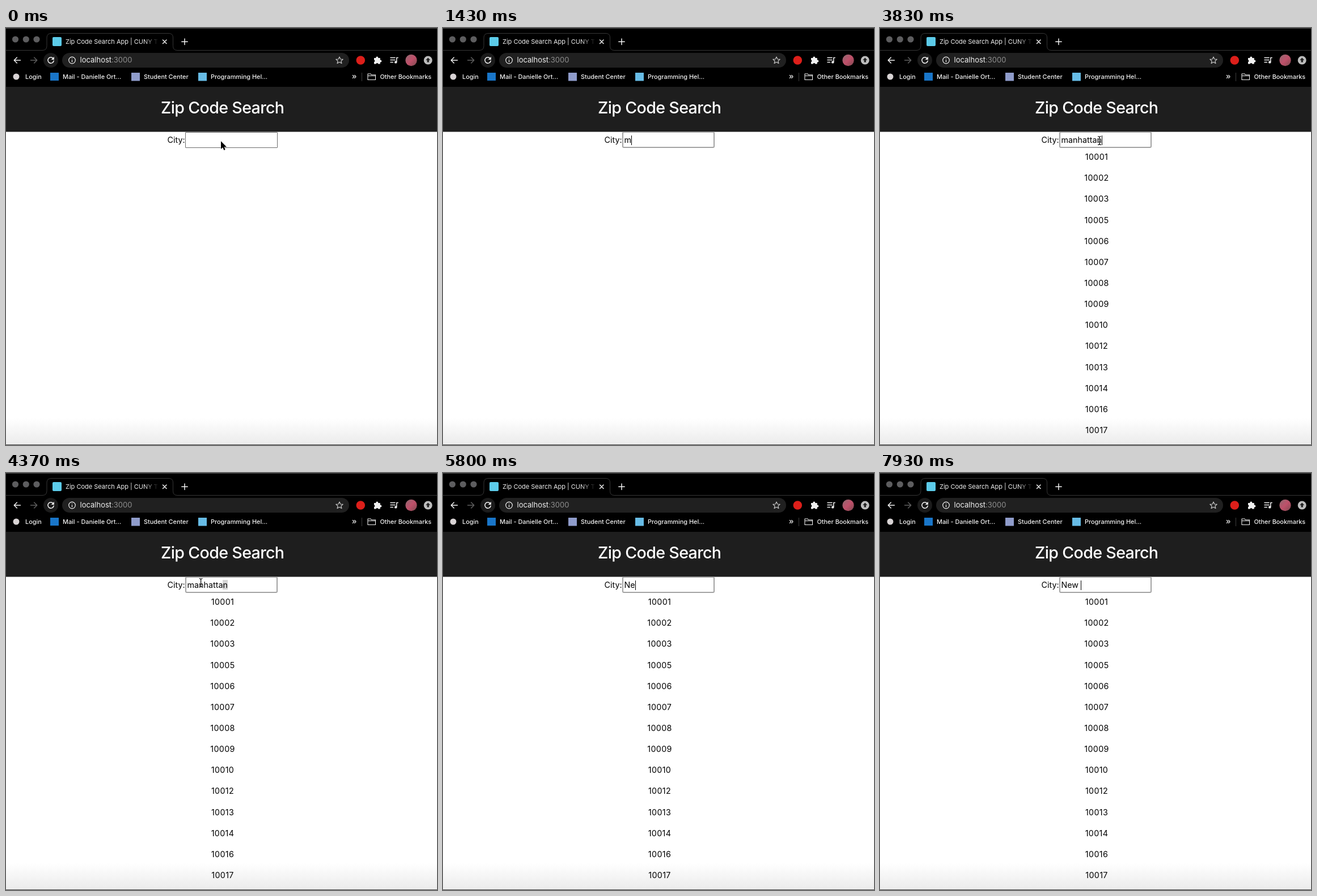
These frames come from a looping animation (760 by 737 pixels, 8000 ms). An HTML page:

```html
<!DOCTYPE html>
<html lang="en">
<head>
<meta charset="utf-8">
<title>Zip Code Search</title>
<style>
  html, body { margin: 0; width: 100%; height: 100%; overflow: hidden; background: #fff; }
  body { position: relative; font-family: Inter, "Liberation Sans", sans-serif; font-optical-sizing: none; }
  svg { position: absolute; left: 0; top: 0; display: block; }
  svg text { white-space: pre; }
  .line { fill: none; stroke: #f1f1f1; stroke-width: 1.5; stroke-linecap: round; stroke-linejoin: round; }
  .tab { font-size: 11px; fill: #f1f1f1; }
  .url { font-size: 13px; fill: #f1f1f1; }
  .marks { font-size: 10.9px; font-weight: 500; fill: #f1f1f1; }
  .title { font-size: 28.6px; font-weight: 500; letter-spacing: -.65px; fill: #fff; }
  .label { font-size: 14.3px; }
  #list { font-size: 14.3px; letter-spacing: .35px; text-anchor: middle; }
  #field {
    position: absolute; left: 316px; top: 184px; width: 162.5px; height: 27.5px;
    box-sizing: border-box; border: 1px solid #6c6c6c; border-radius: 1px; background: #fff;
  }
  #field.focus { left: 315.5px; top: 183px; width: 163px; height: 29px; border: 2px solid #a3a3a3; border-radius: 3px; }
  #entry {
    position: absolute; left: 319.5px; top: 184px; height: 27px; line-height: 27px;
    font-size: 14.3px; white-space: pre; color: #000;
  }
  #entry mark { background: #d4d4d4; color: inherit; }
  #caret { display: inline-block; width: 1px; height: 17px; margin-right: -1px; vertical-align: -4px; background: #000; }
  #menu {
    position: absolute; left: 316px; top: 212px; width: 178px; height: 82px; border-radius: 4px;
    background: #242424; box-shadow: 0 1px 3px rgba(0, 0, 0, .45);
    color: #f1f1f1; font-size: 12px; font-weight: 500; letter-spacing: .25px;
  }
  #menu div { position: relative; left: 11px; top: 8px; height: 33.4px; line-height: 33.4px; }
</style>
</head>
<body>
<svg width="760" height="737" viewBox="0 0 760 737">
  <defs>
    <linearGradient id="fade"><stop offset="0" stop-opacity="0"/><stop offset="1"/></linearGradient>
    <linearGradient id="floor" x2="0" y2="1">
      <stop offset="0" stop-color="#fff"/><stop offset="1" stop-color="#ebebeb"/>
    </linearGradient>
    <linearGradient id="face" x2="1" y2="1">
      <stop offset="0" stop-color="#8c6a70"/><stop offset=".5" stop-color="#c0506a"/><stop offset="1" stop-color="#7d4a50"/>
    </linearGradient>
  </defs>

  <rect width="760" height="104"/>
  <rect width="760" height="1" fill="#4a4a4a"/>
  <rect y="104" width="760" height="79.5" fill="#1e1e1e"/>
  <rect y="690" width="760" height="46" fill="url(#floor)"/>
  <rect y="736" width="760" height="1" fill="#4a4a4a"/>

  <!-- tab strip -->
  <g fill="#5d5d5f"><circle cx="16.5" cy="20" r="5.6"/><circle cx="35.3" cy="20" r="5.6"/><circle cx="54" cy="20" r="5.6"/></g>
  <path d="M0 39.5H64Q72 39.5 72 31.5V17Q72 9.5 80 9.5H287Q294.5 9.5 294.5 17V31.5Q294.5 39.5 302 39.5H760" fill="none" stroke="#363636"/>
  <rect x="82" y="16" width="16" height="16" rx="2" fill="#5ccbe9"/>
  <text class="tab" x="105" y="28">Zip Code Search App | CUNY T</text>
  <rect x="243" y="14" width="26" height="20" fill="url(#fade)"/>
  <path class="line" d="M276.5 21l6.5 6.5M283 21l-6.5 6.5"/>
  <path class="line" stroke-width="1.8" d="M315 19v10.4M309.8 24.2h10.4"/>

  <!-- toolbar -->
  <path class="line" d="M25.5 57H14.5M19.3 52l-5 5 5 5"/>
  <path class="line" style="stroke:#5f5f5f" d="M43.5 57h11M49.7 52l5 5-5 5"/>
  <circle cx="79" cy="57" r="13" fill="#1b1b1b"/>
  <path class="line" d="M83.2 53.8A5.2 5.2 0 1 0 84.2 58"/>
  <path d="M84.9 50.8v5.2h-5.2z" fill="#f1f1f1"/>
  <rect x="99" y="44" width="506" height="26" rx="13" fill="#202020"/>
  <circle class="line" style="stroke-width:1.2" cx="116.5" cy="57" r="5.8"/>
  <path class="line" style="stroke-width:1.3" d="M116.5 56.8v3M116.5 54.1v.1"/>
  <text class="url" x="130.5" y="61.4">localhost<tspan fill="#8f8f8f">:3000</tspan></text>
  <path class="line" style="stroke:#c9c9c9;stroke-width:1.2" d="M588 51l1.8 4 4.4.4-3.3 2.9 1 4.3-3.9-2.3-3.9 2.3 1-4.3-3.3-2.9 4.4-.4z"/>
  <circle cx="625.3" cy="57" r="7.8" fill="#dd1f1a"/>
  <path d="M649 53h3.4a2 2 0 1 1 3.8 0h3.6v3.6a2 2 0 1 1 0 3.8V63.500h-3.500a2 2 0 0 0-3.800 0H649v-3.400a2 2 0 0 0 0-3.800z" fill="#f1f1f1"/>
  <path class="line" d="M678 52.500h8M678 56.500h8M678 60.500h4.500M688.800 60V52.500h2.400"/>
  <circle cx="687.200" cy="60.400" r="2.200" fill="#f1f1f1"/>
  <circle cx="714.500" cy="57" r="10.200" fill="url(#face)"/>
  <circle cx="744.200" cy="57" r="7.500" fill="#bdbdbd"/>
  <path d="M744.200 52.500l4 4.300h-2.300v3.700h-3.400v-3.700h-2.300z" fill="#222"/>

  <!-- bookmarks -->
  <circle cx="18" cy="86" r="5.500" fill="#d8d3d4"/>
  <rect x="78" y="79" width="15" height="14" fill="#1976c9"/>
  <rect x="221" y="79" width="15" height="14.500" fill="#8f9ccb"/>
  <rect x="339" y="79" width="15" height="14.500" fill="#67bce6"/>
  <g class="marks">
    <text x="34" y="90">Login</text>
    <text x="100" y="90">Mail - Danielle Ort...</text>
    <text x="243" y="90">Student Center</text>
    <text x="361" y="90">Programming Hel...</text>
    <text x="659.500" y="90">Other Bookmarks</text>
  </g>
  <path class="line" style="stroke-width:1.200" d="M611.500 83.500l2.300 2.500-2.300 2.500M614.700 83.500l2.300 2.500-2.300 2.500"/>
  <path d="M627.500 79v15" stroke="#3d3d3d"/>
  <path class="line" style="stroke-width:1.100" d="M638 91.500v-10.500h5l1.500 1.800h7v8.700zM638 84.500h13.500"/>

  <!-- page -->
  <text class="title" x="273" y="151">Zip Code Search</text>
  <text class="label" x="284.600" y="203">City:</text>
  <g id="list"></g>
</svg>

<div id="field"></div>
<div id="entry"><span id="plain"></span><mark id="marked"></mark><i id="caret"></i></div>
<div id="menu"><div>11355</div><div>11344</div></div>

<svg width="760" height="737" viewBox="0 0 760 737">
  <path id="arrow" d="M0 0V14L3.200 11L5.400 16L7.700 15L5.600 10.200H10Z" stroke="#fff" stroke-width="1" paint-order="stroke"/>
  <g id="beam" fill="none">
    <path d="M-3-7.500Q0-7.500 0-5.500Q0-7.500 3-7.500M0-5.500V5.500M-3 7.500Q0 7.500 0 5.500Q0 7.500 3 7.500M-1.500 2.500H1.500" stroke="#fff" stroke-width="2.400" stroke-opacity=".7"/>
    <path d="M-3-7.500Q0-7.500 0-5.500Q0-7.500 3-7.500M0-5.500V5.500M-3 7.500Q0 7.500 0 5.500Q0 7.500 3 7.500M-1.500 2.500H1.500" stroke="#000" stroke-width="1.200"/>
  </g>
</svg>

<script>
const LOOP = 8000, FOCUS = 530, BLINK = 500;
const $ = id => document.getElementById(id);
const show = (el, on) => { el.style.visibility = on ? 'visible' : 'hidden'; };

// [time, field text]
const keys = [
  [0, ''], [1400, 'm'], [1570, 'ma'], [1700, 'man'], [1970, 'manh'], [2100, 'manha'],
  [2300, 'manhat'], [2470, 'manhatt'], [2600, 'manhatta'], [2770, 'manhattan'],
  [4970, ''], [5500, 'N'], [5800, 'Ne'], [5930, 'New'], [6130, 'New '], [6370, 'New Y'],
  [6570, 'New Yr'], [6670, 'New Yro'], [6930, 'New Yrok'], [7270, 'New Yro'],
  [7430, 'New Yr'], [7600, 'New Y'], [7770, 'New ']
];
// [time, index where the selection starts]
const picks = [[0, 9], [4350, 8], [4400, 2], [4450, 0]];
// [from, to, shape]
const pointers = [
  [0, 430, 'arrow'], [430, 1400, 'beam'], [3830, 4540, 'beam'], [4540, 4970, 'arrow'], [7640, 7770, 'arrow']
];
// [time, x, y]
const path = [
  [0, 379, 200], [400, 379, 200], [500, 387, 199], [3870, 387, 199], [4150, 410, 199],
  [4300, 410, 199], [4370, 344, 194], [4440, 318, 193], [4530, 304.5, 193], [LOOP, 304.5, 193]
];

const latest = (rows, t) => rows.filter(r => r[0] <= t).pop();

function place(t) {
  const i = Math.max(1, path.findIndex(p => p[0] > t));
  const a = path[i - 1], b = path[i], k = (t - a[0]) / (b[0] - a[0]);
  return [a[1] + (b[1] - a[1]) * k, a[2] + (b[2] - a[2]) * k];
}

const skipped = [4, 11, 15];
for (let n = 1, row = 0; n <= 17; n++) {
  if (skipped.includes(n)) continue;
  const text = document.createElementNS('http://www.w3.org/2000/svg', 'text');
  text.setAttribute('x', 382);
  text.setAttribute('y', 233.2 + 37.13 * row++);
  text.textContent = 10000 + n;
  $('list').append(text);
}

function draw(t) {
  const [typed, text] = latest(keys, t);
  const cut = text.length === 9 ? latest(picks, t)[1] : text.length;
  $('plain').textContent = text.slice(0, cut);
  $('marked').textContent = text.slice(cut);

  const click = t >= 4200 ? 4200 : FOCUS;
  const since = t - Math.max(typed, click);
  show($('caret'), t >= FOCUS && cut === text.length && since % (2 * BLINK) < BLINK);

  $('field').className = t >= FOCUS ? 'focus' : '';
  $('menu').style.opacity = t < 1400 ? Math.min(1, Math.max(0, (t - 550) / 70)) : 0;
  show($('list'), t >= 3170);

  const active = pointers.find(p => t >= p[0] && t < p[1]);
  for (const id of ['arrow', 'beam']) {
    show($(id), active && active[2] === id);
    $(id).setAttribute('transform', `translate(${place(t)})`);
  }
}

const start = performance.now();
function tick() {
  draw((performance.now() - start) % LOOP);
  requestAnimationFrame(tick);
}
tick();
</script>
</body>
</html>
```
